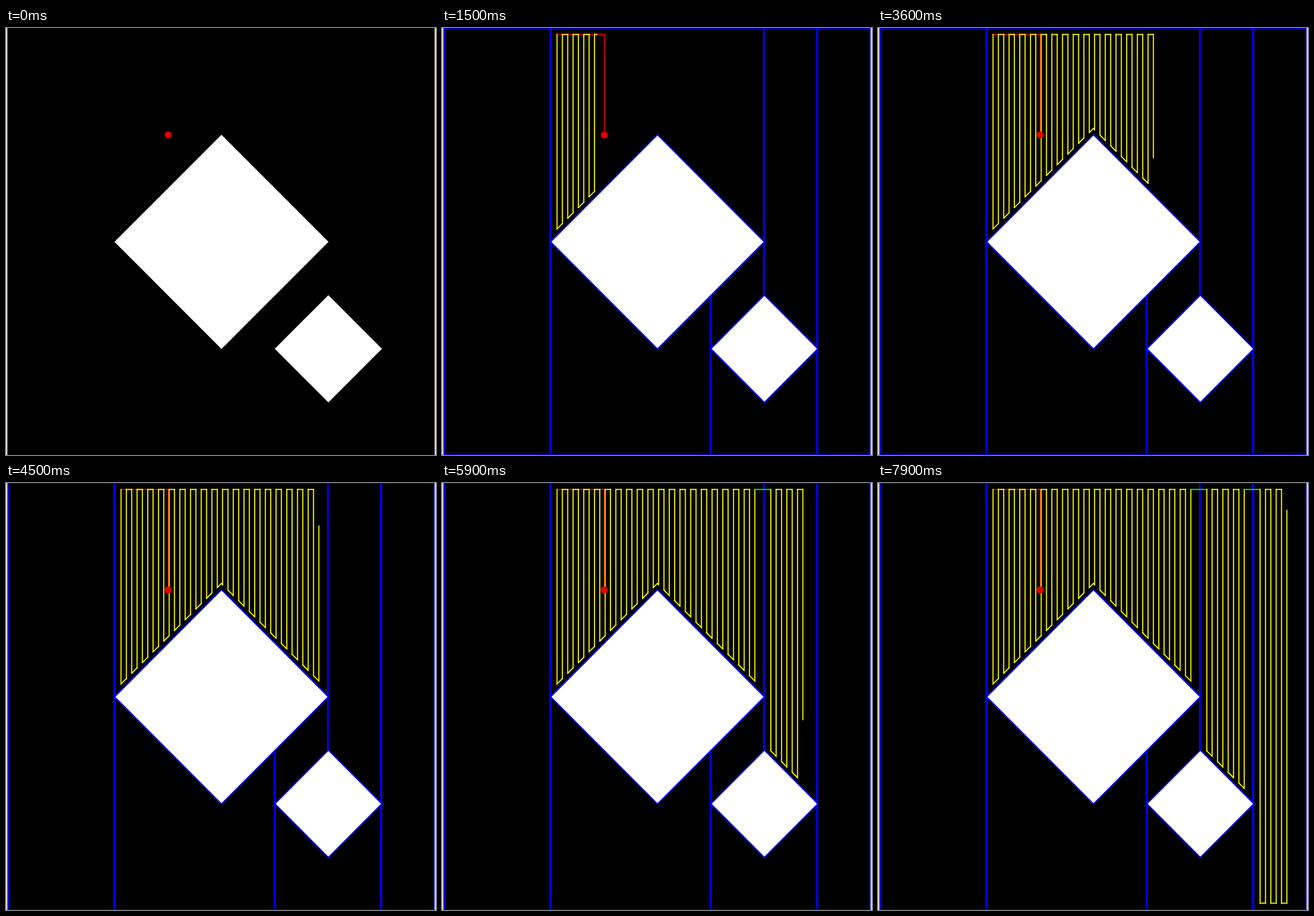
Write an HTML page with a canvas that moves like this. It is 600x595 px and loops after 8000 ms.

```html
<!DOCTYPE html>
<html lang="en">
<head>
<meta charset="utf-8">
<title>Coverage path</title>
<style>
html, body { margin: 0; width: 100%; height: 100%; overflow: hidden; background: #000; }
canvas { display: block; }
</style>
</head>
<body>
<canvas id="stage" width="600" height="595"></canvas>
<script>
const ctx = document.getElementById('stage').getContext('2d');
const LOOP = 8000, STEP = 100, TOP = 9, GAP = 7.46;
const START = [226.5, 149];
const BLUE = '#00f', YELLOW = '#ff0', GREEN = '#0f0', RED = '#e60000';

// Each segment: start, end, colour, length and distance from the path's start.
const segments = [];
let pen = START, total = 0;
function go(x, y, color) {
  const size = Math.hypot(x - pen[0], y - pen[1]);
  segments.push({ a: pen, b: [x, y], color, size, from: total });
  total += size;
  pen = [x, y];
}

// Sweep a cell down and up, following its floor between columns.
function sweep(x0, pairs, floor, peak) {
  for (let i = 0; i < pairs; i++) {
    const left = x0 + 2 * i * GAP, right = left + GAP;
    if (i) go(left, TOP, YELLOW);
    go(left, floor(left), YELLOW);
    if (left < peak && peak < right) go(peak, floor(peak), YELLOW);
    go(right, floor(right), YELLOW);
    go(right, TOP, YELLOW);
  }
}

go(START[0], TOP, RED);
go(160.5, TOP, RED);
const approach = total;
sweep(160.5, 19, x => 140 + Math.abs(x - 300.5), 300.5);
go(458.8, TOP, GREEN);
sweep(458.8, 4, x => 364.5 + x - 450);
go(533.2, TOP, GREEN);
sweep(533.2, 3, () => 585.5);

// Distance along the path of the point nearest to (x, y).
function distanceAt(x, y) {
  let best = Infinity, result = 0;
  for (const s of segments.slice(2)) {
    const d = Math.hypot(x - s.a[0], y - s.a[1]);
    const excess = d + Math.hypot(x - s.b[0], y - s.b[1]) - s.size;
    if (excess < best) { best = excess; result = s.from + d; }
  }
  return result;
}

const pace = [
  [100, 0], [475, approach],
  ...[[1500, 216, 9], [2700, 317.2, 77], [4500, 436.5, 60],
      [5300, 481.2, 37], [6600, 540.7, 342], [7900, 570.5, 38]]
    .map(([t, x, y]) => [t, distanceAt(x, y)])
];

function travelled(t) {
  if (t <= pace[0][0]) return 0;
  let i = 1;
  while (i < pace.length - 1 && t > pace[i][0]) i++;
  const [t0, d0] = pace[i - 1], [t1, d1] = pace[i];
  return d0 + (d1 - d0) * (t - t0) / (t1 - t0);
}

function line(x1, y1, x2, y2, color, width) {
  ctx.strokeStyle = color;
  ctx.lineWidth = width;
  ctx.beginPath();
  ctx.moveTo(x1, y1);
  ctx.lineTo(x2, y2);
  ctx.stroke();
}

function diamond(x, y, r, outlined) {
  ctx.beginPath();
  ctx.moveTo(x, y - r);
  ctx.lineTo(x + r, y);
  ctx.lineTo(x, y + r);
  ctx.lineTo(x - r, y);
  ctx.closePath();
  ctx.fillStyle = '#fff';
  ctx.fill();
  if (outlined) {
    ctx.strokeStyle = BLUE;
    ctx.lineWidth = 1.8;
    ctx.stroke();
  }
}

function draw(t) {
  const divided = t >= 100;
  ctx.lineCap = 'butt';
  ctx.fillStyle = '#d4d0c8';
  ctx.fillRect(0, 0, 600, 595);
  ctx.fillStyle = '#000';
  ctx.fillRect(2, 0, 596, 595);

  if (divided) {
    line(3, 0, 3, 595, BLUE, 2);
    line(597.2, 0, 597.2, 595, BLUE, 1.6);
    line(2, 0.5, 598, 0.5, BLUE, 1);
    line(2, 594.5, 598, 594.5, BLUE, 1);
    line(151.2, 0, 151.2, 595, BLUE, 3);
    line(449.2, 0, 449.2, 372, BLUE, 2.6);
    line(374.8, 372, 374.8, 595, BLUE, 2.6);
    line(523.5, 0, 523.5, 595, BLUE, 3);
  }
  diamond(300.7, 298, 149.3, divided);
  diamond(449.8, 447, 74.8, divided);

  const reach = travelled(t);
  ctx.lineCap = 'square';
  for (const { a, b, color, size, from } of segments) {
    if (from >= reach) break;
    const k = Math.min(1, (reach - from) / size);
    line(a[0], a[1], a[0] + (b[0] - a[0]) * k, a[1] + (b[1] - a[1]) * k, color, 1.5);
  }

  ctx.fillStyle = RED;
  ctx.beginPath();
  ctx.arc(226.3, 149, 4.8, 0, 2 * Math.PI);
  ctx.fill();
}

const begin = performance.now();
function tick() {
  const t = (performance.now() - begin) % LOOP;
  draw(Math.floor(t / STEP) * STEP);
  requestAnimationFrame(tick);
}
tick();
</script>
</body>
</html>
```
